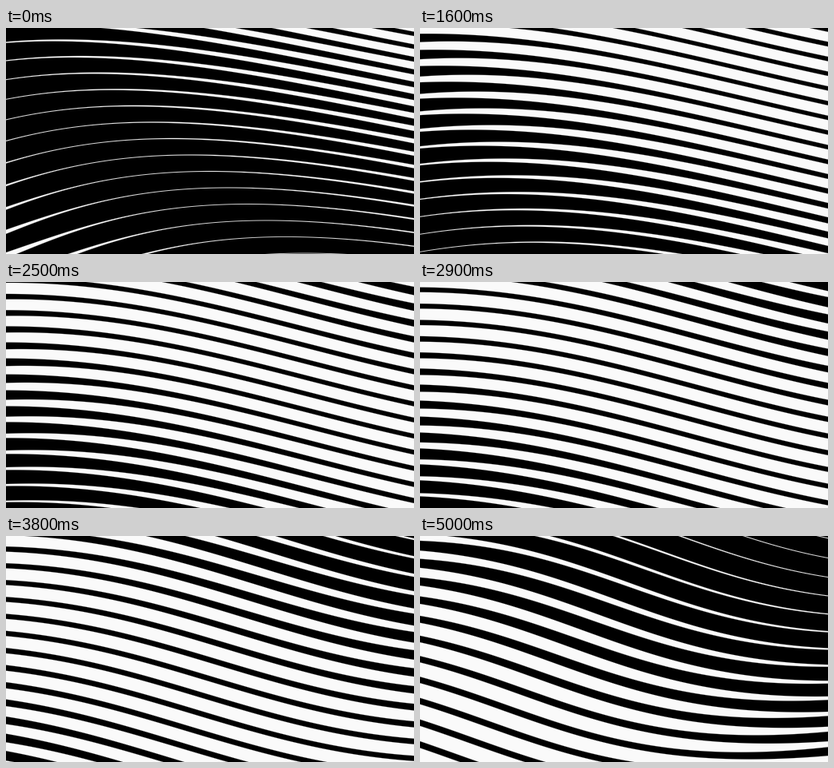
Write an HTML page with a canvas that moves like this. It is 510 by 283 pixels and loops after 5100 ms.

```html
<!DOCTYPE html>
<html lang="en">
<head>
<meta charset="utf-8">
<title>Rolling stripes</title>
<style>
  html, body { margin: 0; width: 100%; height: 100%; overflow: hidden; background: #000; }
  canvas { display: block; width: 510px; height: 283px; }
</style>
</head>
<body>
<canvas id="stage" width="510" height="283"></canvas>
<script>
const W = 510, H = 283, LOOP = 5100, STEP = 100;
const GAP = 20.5;               // distance between stripes
const AMP = 60.5, FREQ = 0.00433; // bend of the stripes
const WHITE = 250;

const ctx = document.getElementById('stage').getContext('2d');
const image = ctx.createImageData(W, H);
const pixels = new Uint32Array(image.data.buffer);
const clamp = (v, lo, hi) => Math.max(lo, Math.min(hi, v));

// Share of each stripe period that is white: a wave travelling down the stage.
function whiteShare(x, y, t) {
  const wave = Math.cos(Math.PI * (y - 100 - 113 * t - 0.52 * x) / 450);
  return 0.37 - 0.335 * Math.sin(1.2 * wave) / Math.sin(1.2);
}

function draw(t) {
  const scroll = 15 + 29.8 * t;
  const slant = 1.16 - 0.435 * t;
  for (let y = 0, i = 0; y < H; y++) {
    for (let x = 0; x < W; x++, i++) {
      const phase = FREQ * (x - slant * (y + 40));
      const slope = AMP * FREQ * Math.sin(phase);
      const u = (y - scroll - AMP * (1 - Math.cos(phase))) / GAP;
      const scale = GAP / Math.hypot(1 + slant * slope, slope);
      const width = whiteShare(x, y, t) * scale;
      const edge = width / 2 - Math.abs(u - Math.round(u)) * scale;
      const light = WHITE * clamp(0.5 + edge / 1.2, 0, Math.min(1, width));
      pixels[i] = 0xff000000 | Math.round(light) * 0x010101;
    }
  }
  ctx.putImageData(image, 0, 0);
}

let shown = -1;
function tick() {
  const step = Math.floor(performance.now() % LOOP / STEP);
  if (step !== shown) {
    shown = step;
    draw(step * STEP / 1000);
  }
  requestAnimationFrame(tick);
}
tick();
</script>
</body>
</html>
```
